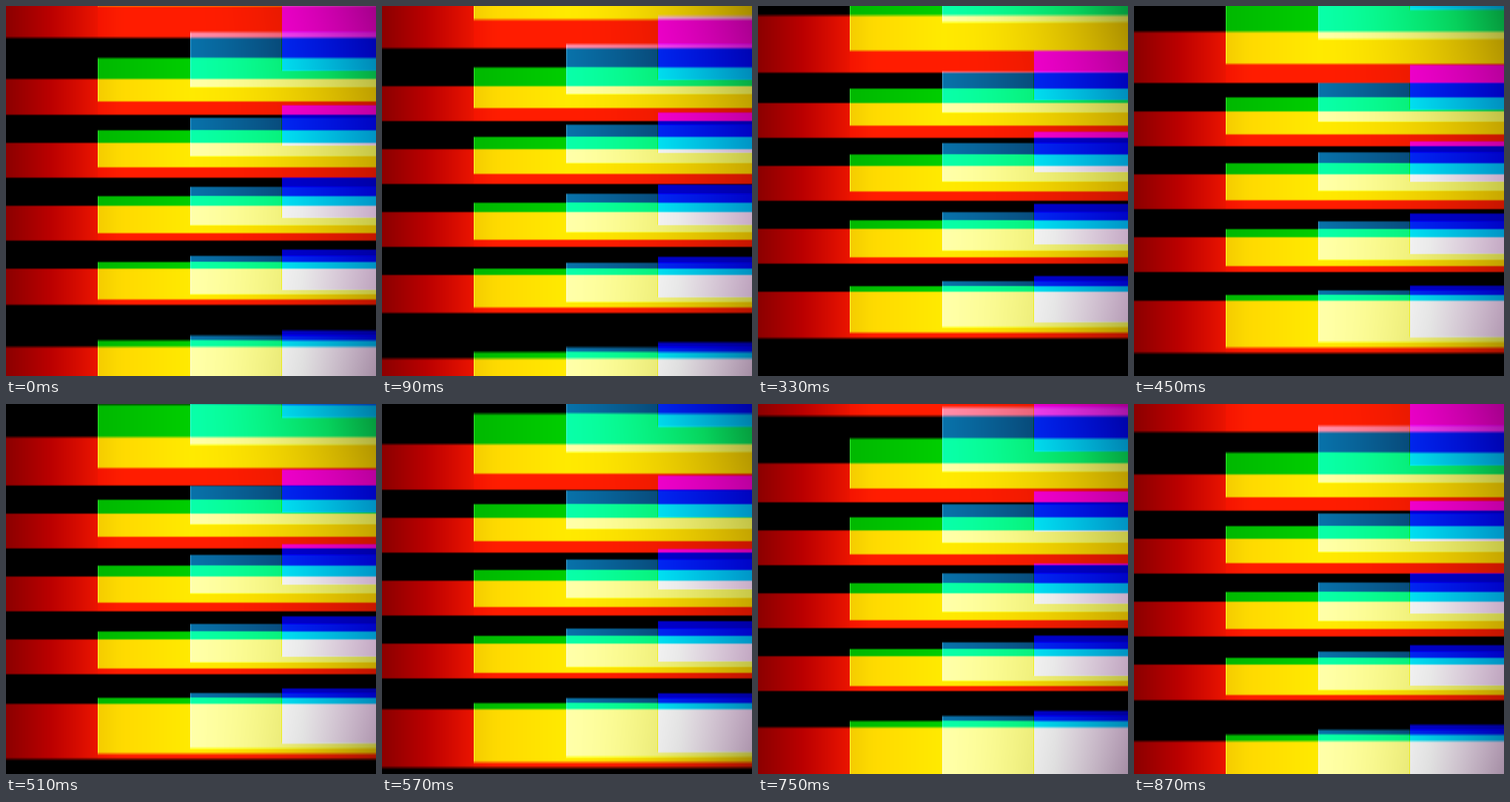
An HTML page with a canvas for the animation above (900 ms loop, 500 by 500 pixels).

```html
<!DOCTYPE html>
<html lang="en">
<head>
<meta charset="utf-8">
<title>Colour bars</title>
<style>
html, body { margin: 0; width: 100%; height: 100%; overflow: hidden; background: #000; }
canvas { display: block; width: 500px; height: 500px; }
</style>
</head>
<body>
<canvas id="stage" width="500" height="500"></canvas>
<script>
const SIZE = 500, LOOP = 900, STEP = 30, SOFT = 2.5;
const ctx = document.getElementById('stage').getContext('2d');
const img = ctx.createImageData(SIZE, SIZE);
const px = img.data;

const clamp = (v, a, b) => Math.max(a, Math.min(b, v));
const mix = (a, b, t) => a + (b - a) * clamp(t, 0, 1);

// Each layer repeats its bar downwards and moves one period per loop.
// Tints add up; the blue light also takes away a little red and green.
const layers = [
  { x: 0, top: 270, len: 47, period: 85,
    tint: x => [x < 124 ? mix(140, 235, x / 124) : mix(244, 262, (x - 124) / 60), mix(0, 28, (x - 60) / 90), 0] },
  { x: 124, top: 257, len: 50, period: 89,
    tint: x => [0, x < 249 ? mix(184, 206, (x - 124) / 125) : mix(206, 186, (x - 249) / 251), 0] },
  { x: 249, top: 244.4, len: 51.8, period: 93.3,
    tint: x => { const t = (x - 249) / 251; return [8, mix(114, 46, t), mix(170, 92, t)]; } },
  { x: 373, top: 231.7, len: 54.2, period: 97.5,
    tint: x => [-8, -40, 215] }
];

// Tints are fixed along x, so they are worked out once.
for (const l of layers) {
  l.rgb = new Float32Array(SIZE * 3);
  for (let x = l.x; x < SIZE; x++) l.rgb.set(l.tint(x), x * 3);
}

// The picture plane is stretched towards the top and bottom.
function unbend(y) {
  const bend = d => d > 0 ? 0.0348 * Math.pow(d, 1.5) : 0;
  return y + bend(110 - y) - bend(y - 390);
}

function cover(l, q, u) {
  const p = l.period;
  let c = (q - l.top - l.len / 2 - p * u) % p;
  if (c < 0) c += p;
  const d = l.len / 2 - Math.min(c, p - c);
  return clamp(d / SOFT + 0.5, 0, 1);
}

const rows = Array.from({ length: SIZE }, (_, y) => unbend(y + 0.5));
const sideShade = Array.from({ length: SIZE }, (_, x) => {
  const s = Math.max(0, (x - 250) / 250);
  return s * s;
});

function draw(ms) {
  const u = Math.floor((ms % LOOP) / STEP) * STEP / LOOP;
  const [red, green, teal, blue] = layers.map(l => l.rgb);
  let i = 0;
  for (let y = 0; y < SIZE; y++) {
    const c = layers.map(l => cover(l, rows[y], u));
    const v = (y - 250) / 250;
    const depth = 0.22 + 0.14 * v * v;
    for (let x = 0; x < SIZE; x++) {
      const k = x * 3;
      const shade = 1 - depth * sideShade[x];
      const glow = x === 124 ? 50 * c[1] : x === 249 ? 55 * c[2] : 0;
      for (let n = 0; n < 3; n++) {
        let s = red[k + n] * c[0] + green[k + n] * c[1] + teal[k + n] * c[2] + blue[k + n] * c[3];
        if (n === 2 && x === 372) s *= 1 - 0.8 * c[3];
        px[i++] = Math.min(255, s + glow) * shade;
      }
      px[i++] = 255;
    }
  }
  ctx.putImageData(img, 0, 0);
}

let last = -1;
function tick() {
  const now = performance.now();
  const step = Math.floor(now / STEP);
  if (step !== last) {
    last = step;
    draw(now);
  }
  requestAnimationFrame(tick);
}
draw(0);
requestAnimationFrame(tick);
</script>
</body>
</html>
```
